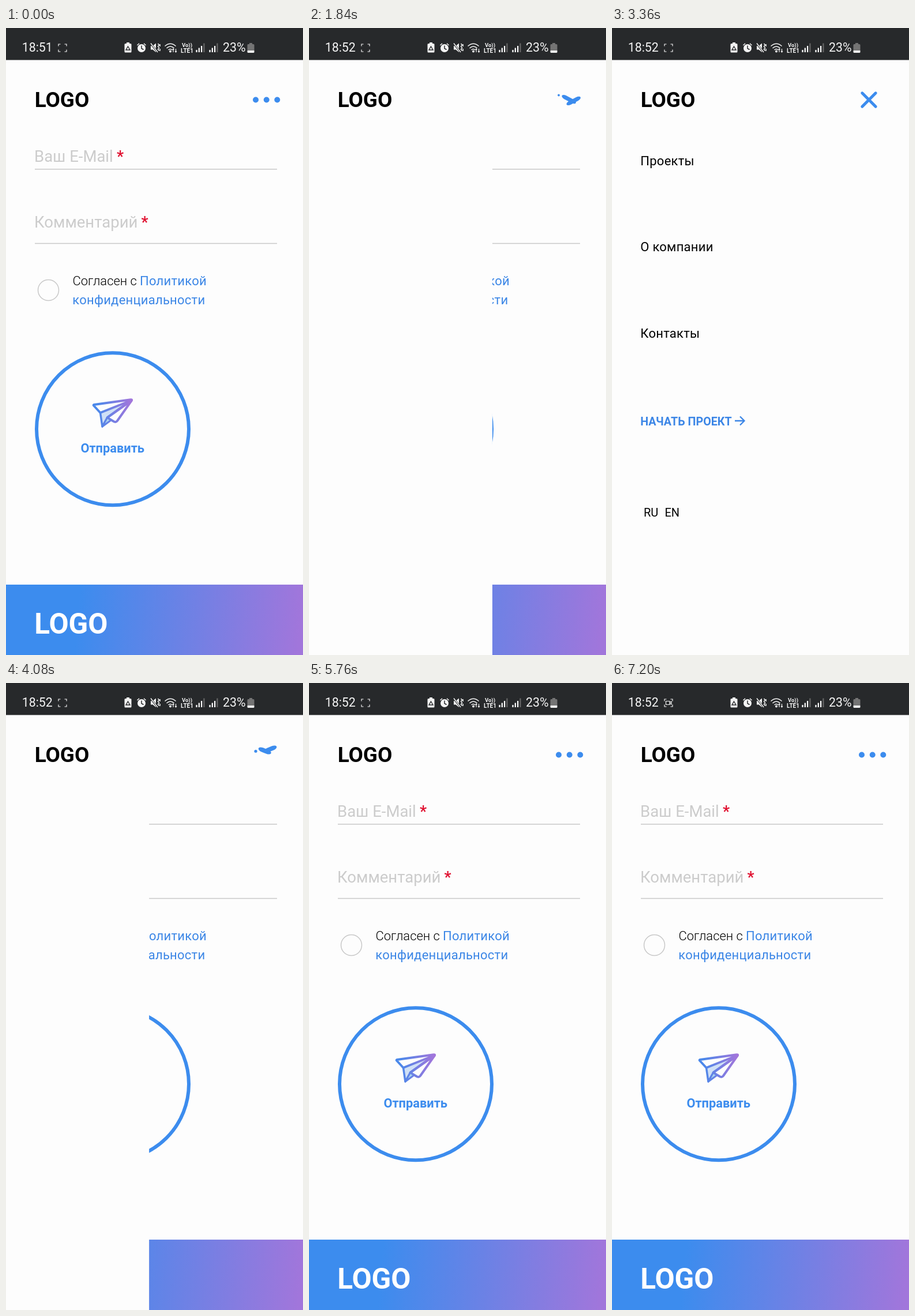
Animation of 515 by 1087 pixels, one loop 7360 ms. Source, as an HTML page:

```html
<!DOCTYPE html>
<html lang="ru">
<head>
<meta charset="utf-8">
<title>Мобильное меню</title>
<style>
  html, body { margin: 0; width: 100%; height: 100%; overflow: hidden; background: #fdfdfd; }
  svg { display: block; width: 515px; height: 1087px; font-family: Roboto, sans-serif; }
  .bold { font-weight: 700; }
  .semi { font-weight: 600; }
  .body { font-size: 22px; letter-spacing: .25px; }
  .thin { font-size: 22px; font-weight: 300; }
  .hint { font-size: 27.5px; fill: #ccc; }
  .star { font-size: 27.5px; font-weight: 500; fill: #e0102f; }
  .status { font-size: 21.3px; }
</style>
</head>
<body>
<svg viewBox="0 0 515 1087">
  <defs>
    <linearGradient id="foot" gradientUnits="userSpaceOnUse" x1="125" y1="1010" x2="510" y2="1042">
      <stop stop-color="#3c8cee"/><stop offset="1" stop-color="#a176db"/>
    </linearGradient>
    <linearGradient id="plane" gradientUnits="userSpaceOnUse" x1="158" y1="0" x2="216" y2="0">
      <stop stop-color="#4a88ea"/><stop offset="1" stop-color="#a176db"/>
    </linearGradient>
    <g id="signal">
      <path d="M1.5 42v-4M5.8 42v-7.5M10.1 42v-11" stroke="#fff" stroke-width="2.2"/>
      <path d="M14.4 42v-15.5" stroke="#666" stroke-width="2.2"/>
    </g>
  </defs>

  <rect width="515" height="1087" fill="#fdfdfd"/>

  <g id="form">
    <text class="hint" x="49" y="232">Ваш E-Mail</text>
    <text class="star" x="192" y="232">*</text>
    <text class="hint" x="49" y="345.5">Комментарий</text>
    <text class="star" x="234.5" y="345.5">*</text>
    <path d="M50 244.7H470M50 373.5H470" stroke="#c8c8c8" stroke-width="1.5"/>
    <circle cx="73.5" cy="454.5" r="18" fill="none" stroke="#c8c8c8" stroke-width="1.5"/>
    <text class="thin" x="115.5" y="445.5">Согласен с</text>
    <g fill="#3b86e6">
      <text class="body" x="232" y="445.5">Политикой</text>
      <text class="body" x="115.3" y="478.7">конфиденциальности</text>
    </g>
    <circle cx="185" cy="695.3" r="132" fill="none" stroke="#3c8cee" stroke-width="6"/>
    <g stroke="url(#plane)" stroke-width="4" stroke-linejoin="round" stroke-linecap="round">
      <path d="M163.500 667L218 644.500L176 675L167 691Z" fill="#cfe0f6" stroke-width="3.500"/>
      <path d="M152 654.500Q151 653.500 153 653L216 644.300Q219 644 217.500 645.500L163.500 667Z" fill="#fdfdfd"/>
      <path d="M218 645.500L193 681Q191 684 187.500 682.500L175.500 675.500Z" fill="#fdfdfd"/>
      <path d="M167 691L175.500 675.500L182 680Z" fill="#a9d5f0" stroke-width="3"/>
    </g>
    <text class="semi" x="184.7" y="736" font-size="21.8" text-anchor="middle" fill="#3c8cee">Отправить</text>
    <rect y="965" width="515" height="122" fill="url(#foot)"/>
    <text class="bold" x="49.2" y="1050.3" font-size="49.5" fill="#fff">LOGO</text>
  </g>

  <g id="menu">
    <rect y="55" width="515" height="1032" fill="#fdfdfd"/>
    <g id="items">
      <text class="body" x="49.3" y="238">Проекты</text>
      <text class="body" x="49.3" y="387.3">О компании</text>
      <text class="body" x="49.3" y="537">Контакты</text>
      <text class="semi" x="49.2" y="689.3" font-size="19.7" fill="#3c86e6">НАЧАТЬ ПРОЕКТ</text>
      <path d="M213 681H229M222 673.5L229.5 681L222 688.5" fill="none" stroke="#3c86e6" stroke-width="2.3"/>
      <text x="55" y="846.7" font-size="20">RU</text>
      <text x="91.5" y="846.7" font-size="20">EN</text>
    </g>
  </g>

  <text class="bold" x="49.7" y="137" font-size="36.8">LOGO</text>
  <g fill="#3c8cee">
    <circle id="dot"/>
    <rect id="barA"/>
    <rect id="barB"/>
  </g>

  <rect width="515" height="55.5" fill="#27292b"/>
  <g fill="#f4f4f4">
    <text id="clock" class="status" x="27.7" y="41.2"></text>
    <text class="status" x="376" y="41.2">23%</text>
    <g fill="none" stroke="#f4f4f4" stroke-width="1.2">
      <path d="M91 31.5V28H94.5M101.500 28H105V31.500M105 37.500V41H101.500M94.500 41H91V37.500"/>
      <path id="camera" d="M93.500 31.500H100V37.500H93.500ZM100 34L103 32V37L100 35"/>
    </g>
    <path d="M209 25h5v2h2q1.500 0 1.500 1.500v12.500q0 1.500-1.500 1.500h-9q-1.500 0-1.500-1.500v-12.500q0-1.500 1.500-1.500h2z"/>
    <path d="M211.500 32L215 38H208Z" fill="none" stroke="#27292b" stroke-width="1.4"/>
    <circle cx="235" cy="35" r="7"/>
    <path d="M227.500 30L231 26.800M239 26.800L242.500 30" stroke="#f4f4f4" stroke-width="1.5"/>
    <path d="M235 30.500V35.500L238.500 37.500" fill="none" stroke="#27292b" stroke-width="1.5"/>
    <path d="M251 31H254.500L260 26.500V42L254.500 37.500H251Z"/>
    <path d="M251 27L263 42" stroke="#27292b" stroke-width="3"/>
    <g fill="none" stroke="#f4f4f4" stroke-width="1.5">
      <path d="M251 26.500L263 42M263.500 27l2 2.500-2 2.500 2 2.500-2 2.500 2 2.500M267 28v4M267 36v4"/>
      <path d="M275.500 31.500Q285 23 294.500 31.500M278.500 35Q285 29 291.500 35M281.500 38Q285 35 288 38"/>
      <path d="M290 42V36M288.500 38L290 36L291.500 38M294.500 36V42M293 40L294.500 42L296 40" stroke-width="1.2"/>
    </g>
    <circle cx="285" cy="40.5" r="2"/>
    <text class="bold" x="305" y="32.5" font-size="9.5">Vo))</text>
    <text class="bold" x="303" y="42.5" font-size="10">LTE1</text>
    <use href="#signal" x="329"/>
    <use href="#signal" x="352"/>
    <path d="M422 26h5v2h2q1.500 0 1.500 1.500v9.500h-12v-9.500q0-1.500 1.500-1.500h2z" fill="#747474"/>
    <path d="M418.500 39h12v2.500q0 1.500-1.500 1.500h-9q-1.500 0-1.500-1.500z"/>
  </g>
</svg>
<script>
const LOOP = 7360, STEP = 80, SLIDE = 400, WIDTH = 515;
const OPEN = 1697, CLOSE = 3959;
const ICON = { x: 445.5, y: 124.5 };
const $ = id => document.getElementById(id);
const clamp = v => Math.max(0, Math.min(1, v));
const mix = (a, b, p) => a + (b - a) * p;

function set(id, attrs) {
  for (const k in attrs) $(id).setAttribute(k, attrs[k]);
}

// cubic-bezier(.25, .1, .25, 1)
function ease(x) {
  if (x <= 0 || x >= 1) return clamp(x);
  const curve = (a, b, s) => 3 * a * s * (1 - s) ** 2 + 3 * b * s * s * (1 - s) + s ** 3;
  let lo = 0, hi = 1;
  for (let i = 0; i < 24; i++) {
    const mid = (lo + hi) / 2;
    if (curve(.25, .25, mid) < x) lo = mid; else hi = mid;
  }
  return curve(.1, 1, lo);
}

// A dot stretches and turns into one stroke of the cross.
function drawBar(id, startX, turn, p, bendX, bendY) {
  const arc = Math.sin(Math.PI * p);
  const cx = mix(startX, ICON.x, p) + bendX * arc;
  const cy = ICON.y + bendY * arc;
  const half = mix(5, 19, p), thick = mix(5, 2.5, p);
  set(id, {
    x: -half, y: -thick, width: 2 * half, height: 2 * thick,
    rx: mix(half, 2.5, p), ry: thick,
    transform: `translate(${cx} ${cy}) rotate(${turn * p})`
  });
}

function draw(t) {
  const closing = t >= CLOSE;
  const p = closing ? 1 - ease((t - CLOSE) / SLIDE) : ease((t - OPEN) / SLIDE);

  set('menu', { transform: `translate(${(p - 1) * WIDTH} 0)` });
  set('items', { opacity: clamp((t - 1960) / 400) });

  set('dot', { cx: 433, cy: mix(ICON.y, 111.5, p), r: 5 * (1 - p) });
  drawBar('barA', 451.7, 45, p, closing ? 0 : 3, closing ? -7 : -1);
  drawBar('barB', 470.3, -45, p, closing ? 0 : 4, closing ? -10 : 2);

  $('clock').textContent = t < 480 ? '18:51' : '18:52';
  set('camera', { visibility: t >= 6880 ? 'visible' : 'hidden' });
}

const start = performance.now();
function tick() {
  const t = (performance.now() - start) % LOOP;
  draw(Math.floor(t / STEP) * STEP);
  requestAnimationFrame(tick);
}
tick();
</script>
</body>
</html>
```
